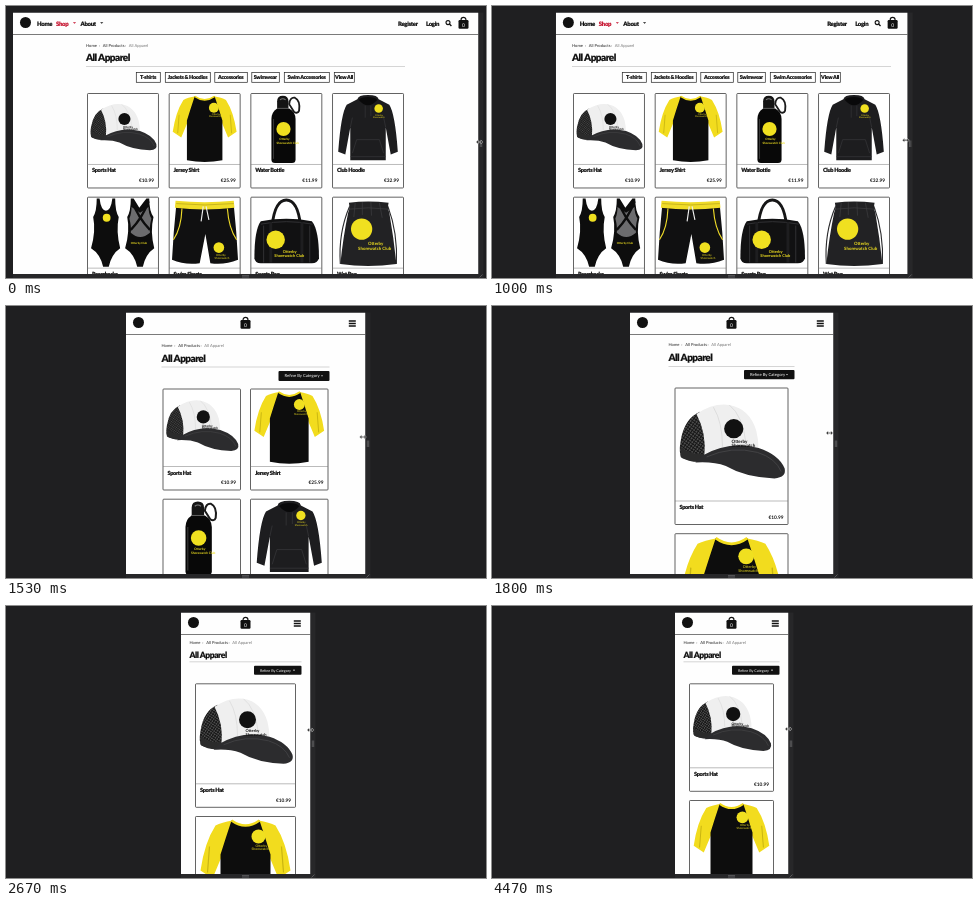
An HTML page that plays this animation: 480x272 px, repeating every 4540 ms.

```html
<!DOCTYPE html>
<html lang="en">
<head>
<meta charset="utf-8">
<title>Responsive shop</title>
<style>
html, body { margin: 0; width: 100%; height: 100%; overflow: hidden; background: #1f1f21; }
svg { display: block; width: 100vw; height: 100vh; }
text { font-family: Lato, sans-serif; text-rendering: geometricPrecision; }
.fat { font-weight: 900; stroke-width: .15; }
</style>
</head>
<body>
<svg id="stage" viewBox="0 0 480 272">
  <defs>
    <clipPath id="clip"><rect id="clipBox" y="6.5" height="261.5"/></clipPath>
    <pattern id="mesh" width="2.4" height="2.4" patternUnits="userSpaceOnUse" patternTransform="rotate(35)">
      <rect width="2.4" height="2.4" fill="#4a4a4a"/><path d="M0 0H2.4M0 0V2.4" stroke="#161616" stroke-width="1.6"/>
    </pattern>
    <symbol id="hat" viewBox="0 0 100 100">
      <path d="M22 21Q8 27 5 47Q3 58 6 62Q16 66 27 64L30 40Z" fill="url(#mesh)"/>
      <path d="M5 52Q14 60 27 58L27 65Q14 67 5 61Z" fill="#2b2b2b"/>
      <path d="M19 23Q34 13 48 15Q66 18 72 38Q74 46 74 55Q45 48 26 60Q28 40 19 23Z" fill="#efefef"/>
      <path d="M48 15Q60 24 63 50M34 17Q42 30 42 52" fill="none" stroke="#d8d8d8" stroke-width=".7"/>
      <path d="M24 60Q48 46 74 53Q92 59 97 71Q99 79 88 80Q62 79 45 69Q34 65 18 66Z" fill="#2c2c2e"/>
      <path d="M28 61Q50 51 73 57Q89 62 94 74" fill="none" stroke="#454547" stroke-width=".8"/>
      <circle cx="52" cy="36" r="8.5" fill="#111"/>
      <g font-size="4" font-weight="700" fill="#111"><text x="50" y="48.5">Otterby</text><text x="50" y="52">Shorewatch</text></g>
    </symbol>
    <symbol id="shirt" viewBox="0 0 100 100">
      <path d="M37 4Q26 6 20 9Q9 26 5 54L17 62L27 38L40 6ZM63 4Q74 6 80 9Q91 26 95 54L83 62L73 38L60 6Z" fill="#f2dc1e"/>
      <path d="M14 30L12 56M86 30L88 56" stroke="#c9b511" stroke-width="1.2"/>
      <path d="M36 4Q50 14 64 4Q70 22 75 38V94Q50 99 25 94V38Q30 22 36 4Z" fill="#0d0d0d"/>
      <path d="M36 4Q50 14 64 4" fill="none" stroke="#f2dc1e" stroke-width="2.4"/>
      <circle cx="63" cy="20" r="7" fill="#f0e020"/>
      <g font-size="3.4" fill="#f0e020"><text x="60" y="30">Otterby</text><text x="56" y="33.5">Shorewatch</text></g>
    </symbol>
    <symbol id="bottle" viewBox="0 0 100 100">
      <path d="M54 15Q55 5 62 6Q70 10 68 24Q66 29 61 26Z" fill="none" stroke="#1b1b1b" stroke-width="2.6"/>
      <path d="M37 11Q37 3 45 3Q53 3 53 11V22H37Z" fill="#141414"/>
      <path d="M41 9Q45 6 49 9" stroke="#777" stroke-width="1.5" fill="none"/>
      <path d="M37 21H54Q63 26 63 36V93Q63 98 58 98H34Q29 98 29 93V36Q29 26 37 21Z" fill="#080808"/>
      <path d="M32 36V92" stroke="#3a3a3a" stroke-width="1.4"/><path d="M37 21H54" stroke="#777"/>
      <circle cx="46" cy="50" r="10" fill="#f0e020"/>
      <g font-size="4.2" font-weight="700" fill="#f0e020"><text x="40" y="66">Otterby</text><text x="36" y="70.5">Shorewatch Club</text></g>
    </symbol>
    <symbol id="hoodie" viewBox="0 0 100 100">
      <path d="M35 8Q36 2 50 2Q64 2 65 8L80 16Q88 28 92 82L82 86L75 48V94H25V48L18 86L8 82Q12 28 20 16Z" fill="#1d1d1f"/>
      <path d="M37 9Q50 24 63 9Q60 5 50 5Q40 5 37 9Z" fill="#09090a"/>
      <path d="M46 17V34M54 17V32M25 48L28 34M75 48L72 34M25 89H75M34 65H66L72 84M34 65L28 84" fill="none" stroke="#39393c" stroke-width=".9"/>
      <circle cx="65" cy="21" r="6" fill="#f0e020"/>
      <g font-size="3.2" fill="#f0e020"><text x="60" y="31">Otterby</text><text x="57" y="34">Shorewatch</text></g>
    </symbol>
    <symbol id="suit" viewBox="0 0 100 100">
      <path id="cut" d="M13 2H17Q19 19 26 19Q33 19 35 2H39Q39 20 44 28Q40 48 46 72Q34 80 30 98H22Q18 80 5 72Q12 48 8 28Q13 20 13 2Z" fill="#0d0d0d"/>
      <path d="M61 2H65L73 15L83 2H87Q87 20 93 28Q88 48 94 72Q82 80 78 98H70Q66 80 53 72Q60 48 56 28Q61 20 61 2Z" fill="#0d0d0d"/>
      <path d="M62 14Q62 24 59 30Q62 42 61 50Q74 62 88 50Q87 42 90 30Q86 24 86 14L74 22Z" fill="#6c6c6e"/>
      <path d="M63 6Q72 30 88 46M86 6Q77 30 61 46" fill="none" stroke="#0d0d0d" stroke-width="3.4"/>
      <circle cx="27" cy="29" r="5.5" fill="#f0e020"/>
      <text x="61" y="66" font-size="4" font-weight="700" fill="#f0e020">Otterby Club</text>
    </symbol>
    <symbol id="shorts" viewBox="0 0 100 100">
      <path d="M10 11H91Q95 48 97 88Q78 96 58 93L51 52L43 93Q22 96 4 88Q6 48 10 11Z" fill="#101011"/>
      <path d="M9 5Q50 9 91 5L92 15Q50 20 8 15Z" fill="#f0dc28"/>
      <path d="M10 9Q50 13 91 9" fill="none" stroke="#b7a51a"/>
      <path d="M18 16Q17 44 6 60M82 16Q84 44 95 60" fill="none" stroke="#f0dc28" stroke-width="1.6"/>
      <path d="M48 13L45 34M52 13L56 32" stroke="#eee" stroke-width="1.6"/>
      <circle cx="70" cy="71" r="7.5" fill="#f0e020"/>
      <g font-size="4" fill="#f0e020"><text x="66" y="83">Otterby</text><text x="64" y="87">Shorewatch</text></g>
    </symbol>
    <symbol id="duffel" viewBox="0 0 100 100">
      <path d="M30 40Q34 4 50 4Q66 4 70 40" fill="none" stroke="#161617" stroke-width="4"/>
      <path d="M14 34Q50 27 86 34Q96 46 96 86Q94 93 86 93H14Q6 93 5 86Q5 46 14 34Z" fill="#111112"/>
      <path d="M14 38Q50 31 87 38M18 40V92M83 40V92" fill="none" stroke="#37373a" stroke-width="1.2"/>
      <path d="M28 35V92M72 35V92" stroke="#1e1e20" stroke-width="4"/>
      <circle cx="35" cy="60" r="13" fill="#f0e020"/>
      <g font-size="5.6" font-weight="700" fill="#f0e020"><text x="45" y="78">Otterby</text><text x="33" y="84.5">Shorewatch Club</text></g>
    </symbol>
    <symbol id="sack" viewBox="0 0 100 100">
      <path d="M24 13Q8 50 11 94M78 13Q92 50 90 94" fill="none" stroke="#2c2c2e" stroke-width="1.6"/>
      <path d="M23 8Q50 4 79 8Q77 16 80 22Q86 56 90 94Q50 100 11 94Q15 56 22 22Q25 16 23 8Z" fill="#222224"/>
      <path d="M22 17Q50 13 80 17M32 8L30 28M42 7V25M54 7L55 26M66 8L70 29" fill="none" stroke="#3e3e41"/>
      <circle cx="41" cy="45" r="15" fill="#f0e020"/>
      <g font-size="6.2" font-weight="700" fill="#f0e020"><text x="50" y="67">Otterby</text><text x="36" y="74.5">Shorewatch Club</text></g>
    </symbol>
  </defs>
  <rect width="480" height="272" fill="#1f1f21"/>
  <g id="frame"></g>
  <g id="page" clip-path="url(#clip)"></g>
  <g id="cursor">
    <path d="M-3.4 0L-1.4 -1.9V-.6H1.4V-1.9L3.4 0L1.4 1.9V.6H-1.4V1.9Z" fill="#222" stroke="#ddd" stroke-width=".5"/>
  </g>
</svg>
<script>
const LOOP = 4540, STEP = 1000 / 15, MID = 239.5, TOP = 6.5, BOTTOM = 268;
const $ = id => document.getElementById(id);

// [step, left edge of the viewport]
const drag = [[0, 7], [4, 16], [8, 32], [9, 39], [16, 68], [19, 100], [24, 125], [27, 138], [32, 156],
  [40, 175], [44, 177.5], [48, 177.5], [54, 179], [57, 179], [61, 182.3], [65, 182.3], [67, 183]];
// [step, offset from right edge, y]
const pointer = [[0, 1, 136], [9, -3, 133], [19, -1, 135], [27, -4, 127], [40, 0, 124], [54, 1, 123], [67, 0, 123]];

const items = [['hat', 'Sports Hat', '10.99'], ['shirt', 'Jersey Shirt', '25.99'],
  ['bottle', 'Water Bottle', '11.99'], ['hoodie', 'Club Hoodie', '32.99'],
  ['suit', 'Racerbacks', '29.99'], ['shorts', 'Swim Shorts', '19.99'],
  ['duffel', 'Sports Bag', '24.99'], ['sack', 'Wet Bag', '9.99']];
const pills = [['T-shirts', 130, 24], ['Jackets & Hoodies', 159, 45], ['Accessories', 208.5, 32.5],
  ['Swimwear', 245.5, 27.5], ['Swim Accessories', 278, 45], ['View All', 328, 20]];

function sample(rows, k, col) {
  const i = Math.max(1, rows.findIndex(r => r[0] >= k));
  const a = rows[i - 1], b = rows[i];
  return a[col] + (b[col] - a[col]) * (k - a[0]) / (b[0] - a[0]);
}

const rect = (x, y, w, h, attrs) => `<rect x="${x}" y="${y}" width="${w}" height="${h}" ${attrs}/>`;
const line = (x1, y, x2, color, w = .6) => `<path d="M${x1} ${y}H${x2}" stroke="${color}" stroke-width="${w}"/>`;
const text = (s, x, y, size, attrs = '') =>
  `<text x="${x}" y="${y}" font-size="${size}" ${attrs}>${s.replace('&', '&amp;')}</text>`;
const fat = (s, x, y, size, color = '#111', attrs = '') =>
  text(s, x, y, size, `class="fat" fill="${color}" stroke="${color}" letter-spacing="${-.055 * size}" ${attrs}`);
const caret = (x, y, color, r = 1.6) => `<path d="M${x - r} ${y}h${2 * r}l${-r} ${r}z" fill="${color}"/>`;

// Breakpoints of the page
function layout(w) {
  const wide = { wide: true, inset: 1.5, gap: 10.7, crumb: 40.5, title: 55, size: 10, rule: 60.5, cards: 87.5 };
  if (w >= 345) return { ...wide, cw: 319, cols: 4 };
  if (w >= 285) return { ...wide, cw: 267, cols: 3 };
  if (w >= 221) return { cw: 168, cols: 2, inset: 1.5, gap: 10, crumb: 41, title: 55.5, size: 10, rule: 61,
    btn: [65, 51, 10, 4.2], cards: 83 };
  if (w >= 165.5) return { cw: 126, cols: 1, inset: 6.5, gap: 0, crumb: 40, title: 54.5, size: 10, rule: 60.5,
    btn: [64, 50.5, 9.3, 4.2], cards: 82 };
  return { cw: w - 17.5, cols: 1, inset: 6, gap: 0, crumb: 38.4, title: 51.5, size: 8.5, rule: 55.8,
    btn: [59.8, 47.5, 9, 3.7], cards: 77.8 };
}

const bag = x => `<path d="M${x - 2.4} 15V13.6a2.4 2.2 0 0 1 4.8 0V15" fill="none" stroke="#111" stroke-width="1.2"/>` +
  rect(x - 5, 14, 10, 8.8, 'rx="1.2" fill="#111"') +
  text('0', x, 20.8, 5, 'fill="#fff" text-anchor="middle"');

function nav(l, r, wide) {
  let s = `<circle cx="${l + 12.5}" cy="16.5" r="5.5" fill="#111"/>` + line(l, 28.5, r, '#222');
  if (!wide) {
    s += bag(MID);
    for (const y of [15, 17.5, 20]) s += line(r - 16.7, y, r - 9.7, '#111', 1.3);
    return s;
  }
  const x = r - 30.5;
  return s + fat('Home', l + 24, 19.6, 6) + fat('Shop', l + 43, 19.6, 6, '#c5132f') + caret(l + 61.5, 16.2, '#c5132f') +
    fat('About', l + 67.5, 19.6, 6) + caret(l + 88.7, 16.2, '#111') +
    fat('Register', r - 80.5, 19.6, 6) + fat('Login', r - 52.5, 19.6, 6) +
    `<path d="M${x + 1.4} 18l2 2" stroke="#111" stroke-width="1.3"/>` +
    `<circle cx="${x}" cy="16.6" r="2" fill="none" stroke="#111" stroke-width="1.1"/>` + bag(r - 15);
}

function head(p, x) {
  const end = x + p.cw, y = p.crumb;
  let s = text('Home', x, y, 4.1, 'fill="#222"') + text('›', x + 12.8, y, 4.1, 'fill="#555"') +
    text('All Products', x + 16.8, y, 4.1, 'fill="#222"') + text('›', x + 39, y, 4.1, 'fill="#555"') +
    text('All Apparel', x + 42.8, y, 4.1, 'fill="#777"') +
    fat('All Apparel', x, p.title, p.size) + line(x, p.rule, end, '#aaa', .5);
  if (p.wide) {
    for (const [name, px, w] of pills)
      s += rect(px + .3, 66.5, w, 9.8, 'fill="#fff" stroke="#222" stroke-width=".7"') +
        fat(name, px + w / 2, 73.3, 5.4, '#111', 'text-anchor="middle"');
    return s;
  }
  const [top, w, h, size] = p.btn;
  return s + rect(end - w, top, w, h, 'rx="1" fill="#111"') +
    text('Refine By Category', end - w + 6, top + h / 2 + size * .35, size, 'fill="#fff"') +
    caret(end - 7.5, top + h / 2 - .5, '#fff', 1.1);
}

function card([id, name, price], x, y, w) {
  return rect(x, y, w, w + 23.5, 'rx=".8" fill="#fff" stroke="#222" stroke-width=".7"') +
    `<use href="#${id}" x="${x}" y="${y}" width="${w}" height="${w}"/>` +
    line(x, y + w, x + w, '#777', .5) + fat(name, x + 4.4, y + w + 8, 5.6) +
    text('€' + price, x + w - 4.4, y + w + 17.8, 4.8, 'font-weight="700" fill="#111" text-anchor="end"');
}

function draw(k) {
  const l = sample(drag, k, 1), r = 2 * MID - l + .5, w = r - l;
  const p = layout(w), x = MID - p.cw / 2;
  const cell = (p.cw - 2 * p.inset - (p.cols - 1) * p.gap) / p.cols;

  $('clipBox').setAttribute('x', l);
  $('clipBox').setAttribute('width', w);
  $('frame').innerHTML = rect(r, TOP, 5, 265.5, 'fill="#272729"') + rect(l, BOTTOM, w + 5, 4, 'fill="#272729"') +
    `<path d="M${r + 1.8} 134.5v6.5M${r + 3.2} 134.5v6.5M236 269.6h7M236 271h7M${r + 1} 271.5l3 -3" stroke="#77777a" stroke-width=".6"/>`;

  let s = rect(l, TOP, w, BOTTOM - TOP, 'fill="#fefefe"') + nav(l, r, p.wide) + head(p, x);
  items.forEach((item, i) => {
    const y = p.cards + Math.floor(i / p.cols) * (cell + 32.7);
    if (y < BOTTOM) s += card(item, x + p.inset + i % p.cols * (cell + p.gap), y, cell);
  });
  $('page').innerHTML = s;
  $('cursor').setAttribute('transform', `translate(${r + sample(pointer, k, 1)} ${sample(pointer, k, 2)})`);
}

let last = -1;
const start = performance.now();
function tick() {
  const t = (performance.now() - start) % LOOP;
  const k = Math.min(67, Math.floor((t + 4) / STEP));
  if (k !== last) draw(last = k);
  requestAnimationFrame(tick);
}
tick();
</script>
</body>
</html>
```
